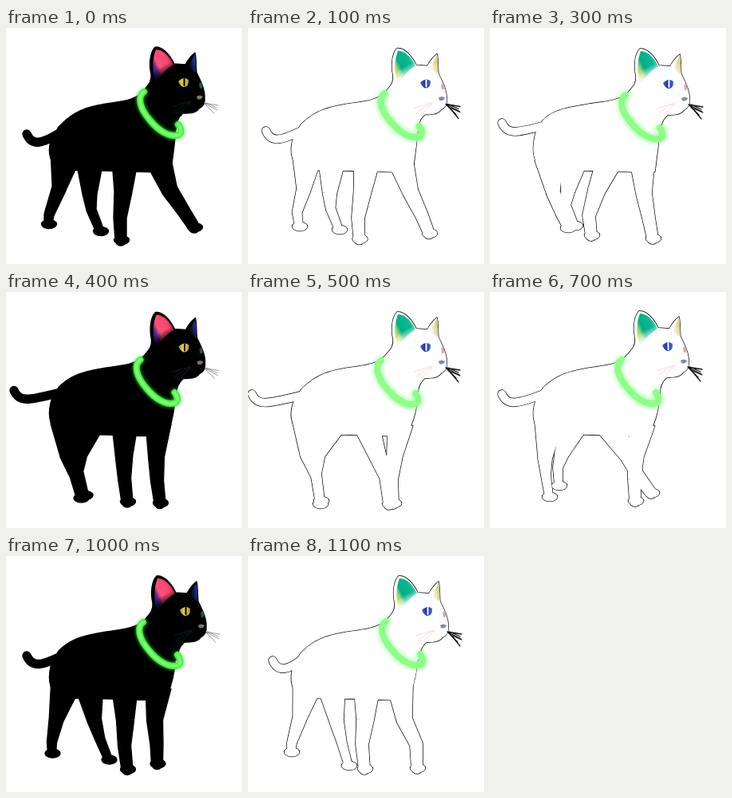
Write an HTML page with a canvas that moves like this. It is 296x296 px and loops after 1.2 s.

```html
<!DOCTYPE html>
<html>
<head>
<meta charset="utf-8">
<title>Walking cat</title>
<style>
html, body { margin: 0; width: 100%; height: 100%; overflow: hidden; background: #fff; }
canvas { display: block; }
</style>
</head>
<body>
<canvas id="stage" width="296" height="296"></canvas>
<script>
const ctx = document.getElementById('stage').getContext('2d');
const STEP = 100, STEPS = 12;
const keys = [0, 2, 3, 5, 7, 9, 11];

// Each leg: hip, radii at hip, knee, ankle and paw, then knee, ankle and paw places per key.
const legs = [
  { hip: [74, 164], radii: [18, 9, 6, 5], pose: [
    [67, 200, 54, 234, 53, 246], [73, 204, 69, 228, 75, 252], [79, 205, 88, 232, 97, 251],
    [74, 203, 85, 231, 90, 266], [69, 208, 70, 230, 74, 257], [61, 208, 60, 232, 61, 249],
    [65, 203, 55, 234, 54, 246]] },
  { hip: [105, 167], radii: [17, 9, 6, 5], pose: [
    [105, 208, 107, 228, 118, 255], [100, 205, 100, 224, 110, 251], [98, 203, 95, 222, 106, 248],
    [88, 203, 86, 228, 91, 262], [90, 203, 85, 220, 86, 243], [110, 203, 118, 225, 131, 248],
    [111, 207, 118, 235, 126, 263]] },
  { hip: [149, 168], radii: [16, 11, 8, 7], pose: [
    [147, 205, 143, 238, 144, 266], [140, 207, 133, 238, 135, 263], [134, 203, 124, 235, 127, 260],
    [162, 204, 173, 232, 177, 266], [174, 205, 184, 228, 202, 252], [152, 207, 154, 240, 158, 268],
    [147, 205, 143, 236, 146, 267]] },
  { hip: [191, 165], radii: [16, 10, 8, 7], pose: [
    [205, 203, 223, 230, 236, 250], [202, 207, 212, 238, 218, 265], [193, 207, 199, 238, 204, 264],
    [184, 205, 180, 235, 182, 265], [183, 205, 181, 235, 182, 262], [177, 205, 167, 236, 167, 255],
    [196, 205, 211, 236, 212, 266]] }
];
// tail tip x, y; rump y; chest x; head dx, dy; collar dx, dy
const frame = [
  [26, 133, 131, 207, 0, 0, 0, 0], [19, 125, 126, 207, 0, 3, -3, 4],
  [15, 119, 123, 207, 1, 2, -3, 4], [5, 128, 130, 199, 0, 1, -6, 6],
  [15, 128, 128, 199, 0, 0, -8, 5], [21, 119, 123, 200, 2, 1, -2, 4],
  [31, 131, 129, 201, 2, 1, 0, 2]];

const head = new Path2D('M172 79C179 71 183 67 182 58C179 44 181 30 187 24C196 23 205 33 211 45L225 46C227 42 232 35 237 31C239 40 238 50 239 56C244 66 250 78 249 88C250 96 246 99 242 101C238 107 229 107 222 107C216 112 213 118 213 128L200 140L165 95Z');
const innerEar = new Path2D('M188 27C198 27 206 37 210 46C202 50 196 58 188 66C183 55 183 40 188 27Z');
const farEar = new Path2D('M237 33Q239 45 238 56L228 49Z');
const eye = new Path2D('M216 67Q223 60 229 65Q230 74 222 74Q218 72 216 67Z');
const farEye = new Path2D('M242 70Q245 66 246 71Q248 76 243 76Z');
const nose = new Path2D('M239 86Q243 83 247 86Q245 91 240 89Z');
const cheekHair = new Path2D('M231 92L208 99M231 93Q220 96 211 106M231 94Q224 98 218 108');
const muzzleHair = new Path2D('M248 94L266 97M248 94L265 103M249 95L261 107M251 94L264 100');
const collar = new Path2D('M173 80C164 86 168 101 180 115C191 129 206 138 217 134C221 131 220 126 216 121');

function blend(rows, step) {
  let i = keys.length - 1;
  while (keys[i] > step) i--;
  const j = (i + 1) % keys.length;
  const f = (step - keys[i]) / ((keys[j] || STEPS) - keys[i]);
  return rows[i].map((v, k) => v + (rows[j][k] - v) * f);
}

function legPath({ hip, radii, pose }, step) {
  const v = [...hip, ...blend(pose, step)], path = new Path2D();
  for (let i = 0; i < 3; i++) {
    const [x, y, u, w] = v.slice(i * 2), r = radii[i], s = radii[i + 1];
    const len = Math.hypot(u - x, w - y), nx = (y - w) / len, ny = (u - x) / len;
    path.moveTo(x + nx * r, y + ny * r);
    path.lineTo(u + nx * s, w + ny * s);
    path.lineTo(u - nx * s, w - ny * s);
    path.lineTo(x - nx * r, y - ny * r);
    path.closePath();
    path.moveTo(u + s, w);
    path.arc(u, w, s, 0, Math.PI * 2, true);
  }
  const [px, py] = v.slice(6);
  path.moveTo(px + 10, py);
  path.ellipse(px + 1, py, 9.5, 5.5, 0, 0, Math.PI * 2, true);
  return path;
}

function at(dx, dy, draw) {
  ctx.save();
  ctx.translate(dx, dy);
  draw();
  ctx.restore();
}

function line(path, color, width) {
  ctx.strokeStyle = color;
  ctx.lineWidth = width;
  ctx.stroke(path);
}

function fill(path, color) {
  ctx.fillStyle = color;
  ctx.fill(path);
}

function ramp(x0, y0, x1, y1, stops) {
  const g = ctx.createLinearGradient(x0, y0, x1, y1);
  stops.forEach(([p, c]) => g.addColorStop(p, c));
  return g;
}

function drawFace(tone, inverted) {
  const coat = tone(0, 0, 0);
  fill(innerEar, ramp(183, 56, 212, 42, [
    [0, tone(30, 30, 150)], [.2, tone(90, 40, 140)], [.36, tone(255, 80, 120)],
    [.75, tone(245, 70, 110)], [1, tone(150, 40, 70)]]));
  fill(innerEar, ramp(194, 48, 200, 60, [[0, tone(0, 0, 0).replace(')', ', 0)')], [1, coat]]));
  fill(farEar, ramp(229, 48, 239, 45, [[0, coat], [1, tone(45, 50, 150)]]));
  fill(eye, ramp(216, 68, 230, 68, [[0, tone(170, 160, 50)], [.5, tone(240, 215, 80)], [1, tone(150, 130, 40)]]));
  line(new Path2D('M223.5 64V72'), inverted ? '#fff' : '#000', 2);
  fill(farEye, tone(25, 90, 75));
  fill(nose, inverted ? '#8088b8' : '#777c60');
  line(cheekHair, tone(5, 60, 55), .6);
  line(muzzleHair, inverted ? '#111' : '#555', inverted ? 1.3 : .6);
  if (inverted) line(new Path2D('M250 95L264 112M252 98L266 104'), '#111', 1.2);
}

function draw(step) {
  const inverted = step % 2 === 1;
  const tone = (...c) => `rgba(${c.map(v => inverted ? 255 - v : v)}, 1)`.replace(', 1)', ')');
  const coat = tone(0, 0, 0);
  const [tx, ty, rump, chest, hx, hy, cx, cy] = blend(frame, step);
  const tail = new Path2D(`M${tx} ${ty}C${tx + 7} ${ty + 16} ${tx + 20} ${ty + 12} 70 ${rump - 1}`);
  const torso = new Path2D(`M66 ${rump - 7}C78 ${rump - 19} 90 101 120 96C140 92 160 93 ${172 + hx} ${79 + hy}L205 105L213 125C212 145 209 160 ${chest} 180C180 182 140 179 122 179L64 178C53 165 52 150 58 ${rump + 6}Z`);
  const shapes = [torso, ...legs.map(leg => legPath(leg, step))];

  ctx.fillStyle = '#fff';
  ctx.fillRect(0, 0, 296, 296);
  ctx.lineCap = ctx.lineJoin = 'round';
  // Outlines first, then fills, so only the outer edge stays visible.
  line(tail, '#000', 11.4);
  shapes.forEach(s => line(s, '#000', 1.4));
  at(hx, hy, () => line(head, '#000', 1.4));
  line(tail, coat, 10);
  shapes.forEach(s => fill(s, coat));
  at(hx, hy, () => {
    fill(head, coat);
    drawFace(tone, inverted);
  });
  at(cx, cy, () => {
    ctx.shadowColor = inverted ? '#8f8' : '#3e3';
    ctx.shadowBlur = inverted ? 7 : 4;
    line(collar, inverted ? '#8cff86' : '#4cee48', 8);
    ctx.shadowBlur = 0;
    if (!inverted) line(collar, '#78ff6c', 4);
  });
}

function tick() {
  draw(Math.floor(performance.now() / STEP) % STEPS);
  requestAnimationFrame(tick);
}
tick();
</script>
</body>
</html>
```
